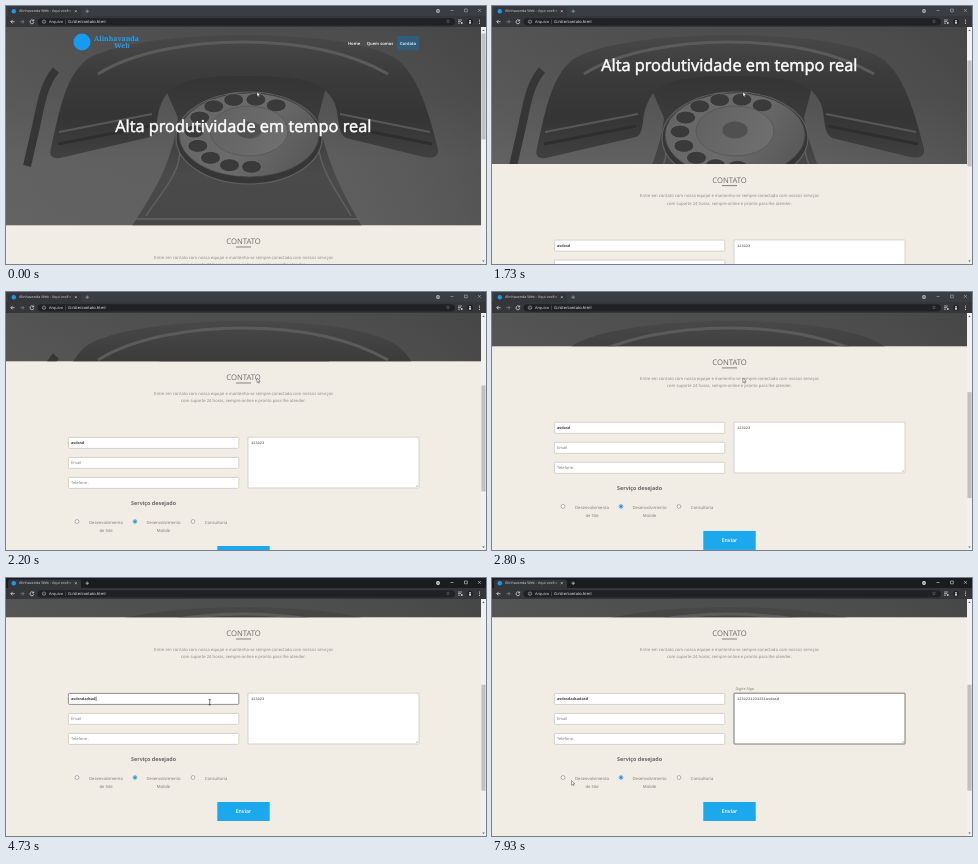
An HTML page with a canvas that plays this animation: 480 px wide and 258 px high, repeating every 8 s.

```html
<!DOCTYPE html>
<html lang="pt">
<head>
<meta charset="utf-8">
<title>Contato</title>
<style>
html, body { margin: 0; width: 100%; height: 100%; overflow: hidden; background: #f2ede4; }
canvas { display: block; width: 480px; height: 258px; }
</style>
</head>
<body>
<canvas id="stage"></canvas>
<script>
const W = 480, H = 258, LOOP = 8000, FPS = 0.015;
const PAGE_TOP = 21, PAGE_W = 475, SANS = '"Open Sans", sans-serif';
const canvas = document.getElementById('stage');
const ctx = canvas.getContext('2d');
const ratio = window.devicePixelRatio || 1;
canvas.width = W * ratio;
canvas.height = H * ratio;
ctx.scale(ratio, ratio);
ctx.textBaseline = 'middle';
ctx.textRendering = 'geometricPrecision';

// Keys are [time, value, ...]; values are interpolated linearly.
const SCROLL = [[733, 0], [1255, 50], [1675, 50], [2200, 150], [2600, 150], [3000, 180]];
const POINTER = [[2800, 251, 86], [3333, 193, 122.5], [4667, 193, 122.5], [5133, 267.5, 134.5],
  [7067, 267.5, 134.5], [7667, 93, 203], [7930, 79.5, 202.5]];
const LABEL_Y = [[5600, 300], [6200, 291]];
const NAME_KEYS = Array.from({ length: 8 }, (_, i) => 4400 + i * 80);
const MESSAGE_KEYS = [5930, 6000, 6070, 6200, 6200, 6270, 6470, 6670, 6730, 6730, 6870, 6930, 7000];
const NAME = 'asdasdadsadasd', MESSAGE = '1231231231231asdasd';
const ACTIVATE = 3530, NAME_FOCUS = 3600, MESSAGE_FOCUS = 5270;

function track(keys, t) {
  const next = keys.findIndex(k => k[0] > t);
  if (next === 0) return keys[0].slice(1);
  if (next < 0) return keys[keys.length - 1].slice(1);
  const a = keys[next - 1], b = keys[next];
  const p = (t - a[0]) / (b[0] - a[0]);
  return a.slice(1).map((v, i) => v + (b[i + 1] - v) * p);
}

function rect(x, y, w, h, color) {
  ctx.fillStyle = color;
  ctx.fillRect(x, y, w, h);
}

function box(x, y, w, h, r, fill, stroke) {
  ctx.beginPath();
  ctx.roundRect(x, y, w, h, r);
  if (fill) { ctx.fillStyle = fill; ctx.fill(); }
  if (stroke) { ctx.strokeStyle = stroke; ctx.lineWidth = 0.7; ctx.stroke(); }
}

function oval(x, y, rx, ry, fill, stroke, width = 0.7) {
  ctx.beginPath();
  ctx.ellipse(x, y, rx, ry, 0, 0, Math.PI * 2);
  if (fill) { ctx.fillStyle = fill; ctx.fill(); }
  if (stroke) { ctx.strokeStyle = stroke; ctx.lineWidth = width; ctx.stroke(); }
}

function shape(d, fill, stroke, width = 1) {
  const path = new Path2D(d);
  if (fill) { ctx.fillStyle = fill; ctx.fill(path); }
  if (stroke) { ctx.strokeStyle = stroke; ctx.lineWidth = width; ctx.stroke(path); }
}

function text(str, x, y, size, color, align = 'left', weight = 400, family = SANS) {
  ctx.font = `${weight} ${size}px ${family}`;
  ctx.textAlign = align;
  ctx.fillStyle = color;
  ctx.fillText(str, x, y);
  return ctx.measureText(str).width;
}

function fade(x0, y0, x1, y1, ...colors) {
  const g = ctx.createLinearGradient(x0, y0, x1, y1);
  colors.forEach((c, i) => g.addColorStop(i / (colors.length - 1), c));
  return g;
}

function telephone() {
  rect(0, 0, PAGE_W, 220, fade(0, 20, 0, 220, '#4d4d4d', '#535353', '#606060', '#626262'));
  rect(0, 0, PAGE_W, 220, fade(0, 0, PAGE_W, 0, '#6664', '#5550', '#3334'));
  // cord
  shape('M50 64 C36 80 34 105 29 125 L21 160', null, '#363636', 8);
  // cradle and body
  shape('M152 66 H324 L312 112 C322 160 338 190 356 220 H126 C145 190 166 160 172 112 Z',
    fade(0, 66, 0, 220, '#343434', '#3c3c3c', '#4a4a4a', '#474747'));
  shape('M174 140 C176 168 152 190 140 210 M312 140 C316 168 334 190 345 210', null, '#5f5f5f', 1.5);
  shape('M128 213 H354', null, '#666', 1.5);
  // handset
  shape('M80 54 C104 38 170 29 236 29 C302 29 366 36 392 54 C414 72 424 112 432 143 C433 150 428 153 418 151 L340 132 C330 126 334 108 328 96 C318 76 300 70 238 70 C180 70 164 78 156 96 C148 112 154 126 144 131 L54 152 C45 153 43 149 45 142 C52 112 58 72 80 54 Z',
    fade(0, 29, 0, 152, '#484848', '#3b3b3b', '#353535', '#404040'));
  shape('M92 68 C130 44 190 36 236 36 C290 36 340 44 382 68', null, '#5b5b5b', 3);
  shape('M53 126 L146 108 M334 108 L424 126', null, '#585858', 2);
  shape('M52 138 L144 120 M336 120 L426 138', null, '#2e2e2e', 3);
  // dial
  oval(243, 132, 73, 46, '#363636', '#606060', 1.2);
  oval(243, 129, 70, 42, fade(180, 90, 305, 170, '#646464', '#6b6b6b', '#565656'), '#444');
  for (let i = 0; i < 10; i++) {
    const a = -0.95 - i * 0.43;
    oval(240 + Math.cos(a) * 52, 127 + Math.sin(a) * 34, 10, 6.5, '#3a3a3a', '#747474', 0.8);
  }
  oval(243, 125, 39, 25, fade(210, 105, 280, 145, '#626262', '#707070'), '#555', 0.8);
  oval(243, 124, 13, 9, '#505050', '#6a6a6a');
}

function field(y, content, focused, weight) {
  box(62.4, y + 0.4, 170.4, 11, 1, '#fff', focused ? '#666' : '#c6c3bd');
  return text(content, 65, y + 5.9, weight ? 3.8 : 4, weight ? '#444' : '#777', 'left', weight || 400);
}

function caret(x, y, t, lastKey) {
  if ((t - lastKey + LOOP) % 1000 < 500) rect(x + 0.3, y - 2.2, 0.6, 4.4, '#222');
}

function lastPressed(keys, t, start) {
  return keys.filter(k => k <= t).pop() || start;
}

function page(t, scroll) {
  rect(0, PAGE_TOP, W, H, '#f2ede4');
  ctx.save();
  ctx.beginPath();
  ctx.rect(0, PAGE_TOP, PAGE_W, H - PAGE_TOP);
  ctx.clip();

  // The hero picture stays fixed while its frame scrolls.
  ctx.save();
  ctx.beginPath();
  ctx.rect(0, 0, PAGE_W, 219.3 - scroll);
  ctx.clip();
  telephone();
  ctx.restore();

  ctx.translate(0, -scroll);
  oval(76, 36, 8.5, 8.5, '#159cf0');
  text('Alinhavanda', 110.5, 33.3, 6.9, '#1ca4f8', 'center', 900, '"Noto Serif", serif');
  text('Web', 116, 40, 6.9, '#1ca4f8', 'center', 900, '"Noto Serif", serif');
  box(391, 30, 22, 14, 1, '#315c7c');
  [['Home', 348], ['Quem somos', 374], ['Contato', 402]].forEach(([s, x]) =>
    text(s, x, 37.6, 4.2, '#fff', 'center', 600));
  const title = 'Alta produtividade em tempo real';
  text(title, 237.3, 122, 16.35, '#fff', 'center');
  ctx.strokeStyle = '#fff';
  ctx.lineWidth = 0.5;
  ctx.strokeText(title, 237.3, 122);

  text('CONTATO', 237.5, 236.2, 7.7, '#6a6a6a', 'center');
  rect(230, 240.6, 15, 0.8, '#666');
  text('Entre em contato com nossa equipe e mantenha-se sempre conectado com nossos serviços',
    237.5, 251.5, 4.2, '#858585', 'center');
  text('com suporte 24 horas, sempre online e pronto para lhe atender.', 237.5, 259, 4.2, '#858585', 'center');
  form(t);
  ctx.restore();
}

function form(t) {
  const onMessage = t >= MESSAGE_FOCUS, onName = t >= NAME_FOCUS && !onMessage;
  const typed = (str, keys) => str.slice(0, 6 + keys.filter(k => k <= t).length);

  if (onMessage) text('Digite Algo', 243.5, track(LABEL_Y, t)[0], 3.7, '#777');
  const nameWidth = field(295, typed(NAME, NAME_KEYS), onName, 700);
  if (onName) caret(65 + nameWidth, 300.8, t, lastPressed(NAME_KEYS, t, NAME_FOCUS));
  field(315, 'Email', false);
  field(335, 'Telefone..', false);

  box(242, 295.2, 171, 50.8, 0.6, '#fff', onMessage ? '#444' : '#c6c3bd');
  shape('M410 345 L412 343 M411.3 345 L412 344.3', null, '#777', 0.4);
  const width = text(typed(MESSAGE, MESSAGE_KEYS), 245, 301, 3.7, '#333', 'left', 400,
    '"Liberation Mono", monospace');
  if (onMessage) caret(245 + width, 301, t, lastPressed(MESSAGE_KEYS, t, MESSAGE_FOCUS));

  text('Serviço desejado', 147.5, 361.3, 5.4, '#666', 'center', 700);
  [71, 129, 187].forEach((x, i) => {
    oval(x, 379.5, 1.9, 1.9, '#fff', i === 1 ? '#1684e0' : '#777', 0.6);
    if (i === 1) oval(x, 379.5, 1.2, 1.2, '#1684e0');
  });
  [['Desenvolvimento', 100, 381], ['de Site', 100, 388.5], ['Desenvolvimento', 157.5, 381],
    ['Mobile', 157.5, 388.5], ['Consultoria', 210, 381]].forEach(([s, x, y]) =>
    text(s, x, y, 4.2, '#777', 'center'));
  rect(211.3, 404, 52.4, 19, '#1ba8ed');
  text('Enviar', 237.5, 413.7, 5.2, '#fff', 'center', 600);
}

function scrollbar(scroll) {
  rect(PAGE_W, PAGE_TOP, 5, H - PAGE_TOP, '#f1f1f1');
  rect(PAGE_W + 0.4, 27.5 + scroll * 0.44, 4.2, 106, '#c1c1c1');
  shape('M476.3 25 L477.5 23.5 L478.7 25 Z M476.3 254.5 L477.5 256 L478.7 254.5 Z', '#555');
}

function browser(active) {
  const light = active ? '#e4e5e7' : '#b5b8bc';
  rect(0, 0, W, 11, active ? '#1b1c1f' : '#3a3d42');
  rect(0, 10, W, 11, '#35363a');
  box(2, 1.5, 73, 10, [2, 2, 0, 0], '#35363a');
  oval(7.8, 5.2, 2.2, 2.2, '#159cf0');
  text('Alinhavanda Web - Aqui você c', 13, 5.2, 3.7, '#d0d2d5');
  rect(64, 2, 3, 7, fade(64, 0, 67, 0, '#35363a00', '#35363a'));
  shape('M68.8 4.2 L70.8 6.2 M70.8 4.2 L68.8 6.2', null, '#d0d2d5', 0.6);
  shape('M79.5 5.2 H83 M81.2 3.5 V7', null, light, 0.6);

  oval(432, 5, 1.9, 1.9, light);
  oval(432, 5, 0.7, 0.7, '#333');
  shape('M444.5 4.5 H447.5 M458.5 3 H461.3 V5.8 H458.5 Z M472 3 L474.8 5.8 M474.8 3 L472 5.8', null, light, 0.55);

  box(31.5, 12.2, 417.5, 7.2, 3.6, '#202124');
  shape('M8.6 15.7 H4.8 M6.6 13.9 L4.8 15.7 L6.6 17.5', null, '#e8eaed', 0.7);
  shape('M14.3 15.7 H18 M16.3 13.9 L18 15.7 L16.3 17.5', null, '#85888d', 0.7);
  shape('M27.2 14.4 A1.9 1.9 0 1 0 27.8 16.2 M27.7 13.5 V15 H26.2', null, '#e8eaed', 0.7);
  oval(38, 15.7, 1.7, 1.7, null, '#c8cacd', 0.5);
  rect(37.75, 15.3, 0.5, 1.3, '#c8cacd');
  text('Arquivo', 43, 15.8, 3.9, '#e0e2e5');
  rect(59.6, 13.6, 0.4, 4.4, '#777');
  text('G:/site/contato.html', 62, 15.8, 4, '#fff');
  text('☆', 442, 15.6, 5, '#d0d2d5', 'center', 400, '"DejaVu Sans", sans-serif');
  shape('M452 14 H456 M452 15.6 H455 M452 17.2 H454', null, '#d0d2d5', 0.7);
  oval(455.8, 17, 0.9, 0.9, '#d0d2d5');
  oval(464, 15.7, 2.9, 2.9, '#202124');
  oval(464, 14.8, 0.9, 0.9, '#e8eaed');
  oval(464, 16.8, 1.2, 0.9, '#e8eaed');
  [13.9, 15.7, 17.5].forEach(y => oval(473.5, y, 0.5, 0.5, '#e8eaed'));
}

function pointer(t, scroll) {
  const [x, y] = track(POINTER, t);
  const docY = y + scroll;
  const inside = (left, right, top, bottom) => x > left && x < right && docY > top && docY < bottom;
  ctx.save();
  ctx.translate(x, y);
  if (inside(62, 233, 295, 306) || inside(242, 413, 295, 346)) {
    shape('M-1.2 -2.6 H1.2 M0 -2.6 V2.6 M-1.2 2.6 H1.2', null, '#222', 0.6);
  } else {
    shape('M0 0 V4.6 L1.1 3.6 L1.8 5.2 L2.5 4.9 L1.8 3.3 H3.3 Z', '#fff', '#222', 0.4);
  }
  ctx.restore();
}

const start = performance.now();
function draw() {
  const now = (performance.now() - start) % LOOP;
  const t = Math.floor((now + 5) * FPS) / FPS + 1;
  const scroll = track(SCROLL, t)[0];
  page(t, scroll);
  scrollbar(scroll);
  browser(t >= ACTIVATE);
  pointer(t, scroll);
  requestAnimationFrame(draw);
}
draw();
</script>
</body>
</html>
```
